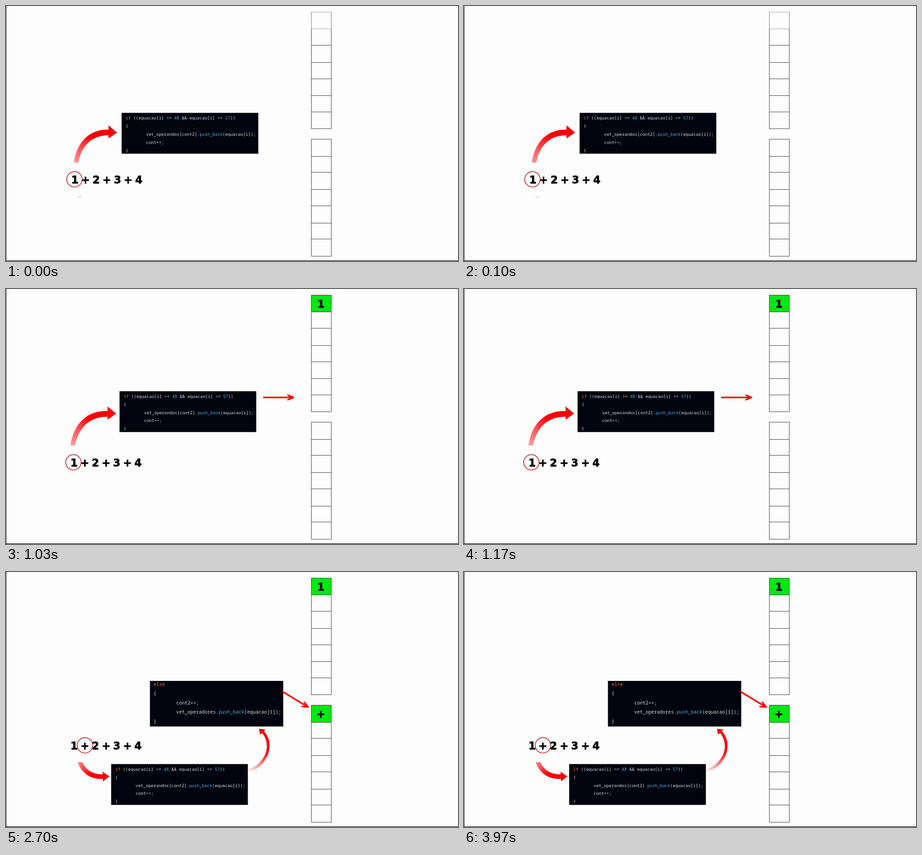
An HTML page with a canvas for the animation above (4010 ms loop, 997 by 562 pixels).

```html
<!DOCTYPE html>
<html lang="pt">
<head>
<meta charset="utf-8">
<style>
html, body { margin: 0; width: 100%; height: 100%; overflow: hidden; background: #fdfdfd; }
canvas { display: block; }
</style>
</head>
<body>
<canvas id="stage" width="997" height="562"></canvas>
<script>
const ctx = document.getElementById('stage').getContext('2d');
const LOOP = 4010, OPERAND_AT = 970, OPERATOR_AT = 2530;
const RED = '#fb0007', GREEN = '#00e714', INK = '#000';
const CODE = { text: '#d9dee5', key: '#ff6a5c', blue: '#4cb5ee' };
const UPPER = [13, 50.5, 86, 124, 160, 197.5, 233, 270.5];
const LOWER = [293, 331, 366.5, 404, 440, 478, 513.5, 551];

const ifCode = [
  [['if', 'key'], [' ((equacao[i] >= '], ['48', 'blue'], [' && equacao[i] <= '], ['57', 'blue'], ['))']],
  [['{']],
  [['        vet_operandos[cont2].'], ['push_back', 'blue'], ['(equacao[i]);']],
  [['        cont++;']],
  [['}']]
];
const elseCode = [
  [['else', 'key']],
  [['{']],
  [['        cont2++;']],
  [['        vet_operadores.'], ['push_back', 'blue'], ['(equacao[i]);']],
  [['}']]
];

function codeBox(lines, x, y, w, h, size, padX, firstBaseline, step) {
  ctx.fillStyle = '#01040e';
  ctx.fillRect(x, y, w, h);
  ctx.font = `${size}px "Noto Sans Mono", monospace`;
  ctx.textAlign = 'left';
  lines.forEach((line, row) => {
    let left = x + padX;
    for (const [text, tone = 'text'] of line) {
      ctx.fillStyle = CODE[tone];
      ctx.fillText(text, left, y + firstBaseline + row * step);
      left += ctx.measureText(text).width;
    }
  });
}
const ifBox = (x, y) => codeBox(ifCode, x, y, 301.5, 90, 9.38, 9, 14.4, 17.9);
const elseBox = (x, y) => codeBox(elseCode, x, y, 294, 100.5, 10.43, 8, 10.6, 20.5);

function glyph(char, x, y) {
  ctx.font = '900 23px "DejaVu Sans", sans-serif';
  ctx.textAlign = 'center';
  ctx.fillStyle = ctx.strokeStyle = INK;
  ctx.lineWidth = 0.8;
  ctx.fillText(char, x, y);
  ctx.strokeText(char, x, y);
}

function equation(x, circleX) {
  [...'1+2+3+4'].forEach((char, i) => glyph(char, x + i * 23.5, 391));
  ctx.strokeStyle = '#bd1218';
  ctx.lineWidth = 1.5;
  ctx.beginPath();
  ctx.arc(circleX, 382, 17, 0, Math.PI * 2);
  ctx.stroke();
}

function stack(rows, value, faintTop) {
  const left = 673.5, width = 44;
  if (value) {
    ctx.fillStyle = GREEN;
    ctx.fillRect(left, rows[0], width, rows[1] - rows[0]);
  }
  ctx.lineWidth = 1;
  const line = (x1, y1, x2, y2, color) => {
    ctx.strokeStyle = color;
    ctx.beginPath();
    ctx.moveTo(x1, y1);
    ctx.lineTo(x2, y2);
    ctx.stroke();
  };
  rows.forEach((y, i) => {
    const edge = Math.floor(y) + 0.5;
    line(left, edge, left + width, edge, faintTop && i < 2 ? '#a5a0b0' : '#3c3c3c');
  });
  for (const x of [left, left + width]) {
    line(x, rows[0], x, rows[1], faintTop ? '#77737f' : '#3c3c3c');
    line(x, rows[1], x, rows[7] + 0.5, '#3c3c3c');
  }
  if (value) glyph(value, left + 21, rows[0] + 28);
}

// Fills an SVG path with a fade from a pale tail to solid red.
function fadeShape(path, from, to, pale) {
  const fade = ctx.createLinearGradient(...from, ...to);
  fade.addColorStop(0, pale);
  fade.addColorStop(0.75, RED);
  ctx.fillStyle = fade;
  ctx.fill(new Path2D(path));
}

function strokeArrow(path) {
  ctx.strokeStyle = RED;
  ctx.lineWidth = 3.3;
  ctx.lineCap = ctx.lineJoin = 'round';
  ctx.stroke(new Path2D(path));
  ctx.lineCap = 'butt';
  ctx.lineJoin = 'miter';
}

function readOperand() {
  ifBox(255, 235.5);
  fadeShape('M149.5 345C156 300 184 271 226 272.5V263L245 279L226 292V285C188 285 166 309 159.5 345Z',
    [150, 345], [212, 275], '#ff9a9a');
  ctx.fillStyle = '#fbdcde';
  ctx.fill(new Path2D('M156 419H167L164 423H160Z'));
  equation(152, 151);
}

function storeOperand() {
  ifBox(250.5, 225.3);
  fadeShape('M142 345C149 296 180 267 224 269V259L243 274.5L224 288V281.5C184 281 160 306 152 345Z',
    [142, 345], [210, 272], '#ffa4a4');
  strokeArrow('M568.5 239H633M622 234L634 239L622 244');
  equation(150.3, 148.7);
}

function storeOperator() {
  elseBox(317.5, 240);
  ifBox(232, 423.3);
  fadeShape('M158 419H168C177 437 191 446 213 446V440L228 450.5L214 461.5V456C186 457 167 444 158 419Z',
    [160, 417], [195, 452], '#ff8b90');
  fadeShape('M536 434C557 429 579 402 575 379C574 369 570 361 565 355L560 358L558 345.5L572 347L569 351C576 359 580 367 581 378C584 406 561 436 536 439Z',
    [538, 438], [577, 372], '#fde3e3');
  strokeArrow('M610.5 264L665 297M658 287L666.5 297.5L653 296.5');
  equation(150.3, 174);
}

function draw(t) {
  ctx.fillStyle = '#fdfdfd';
  ctx.fillRect(0, 0, 997, 562);
  ctx.fillStyle = '#222';
  ctx.fillRect(0, 0, 1, 562);
  ctx.fillRect(0, 560.7, 997, 1.3);
  const hasOperand = t >= OPERAND_AT, hasOperator = t >= OPERATOR_AT;
  stack(UPPER, hasOperand && '1', !hasOperand);
  stack(LOWER, hasOperator && '+');
  if (hasOperator) storeOperator();
  else if (hasOperand) storeOperand();
  else readOperand();
}

const start = performance.now();
function tick() {
  draw((performance.now() - start) % LOOP);
  requestAnimationFrame(tick);
}
tick();
</script>
</body>
</html>
```
